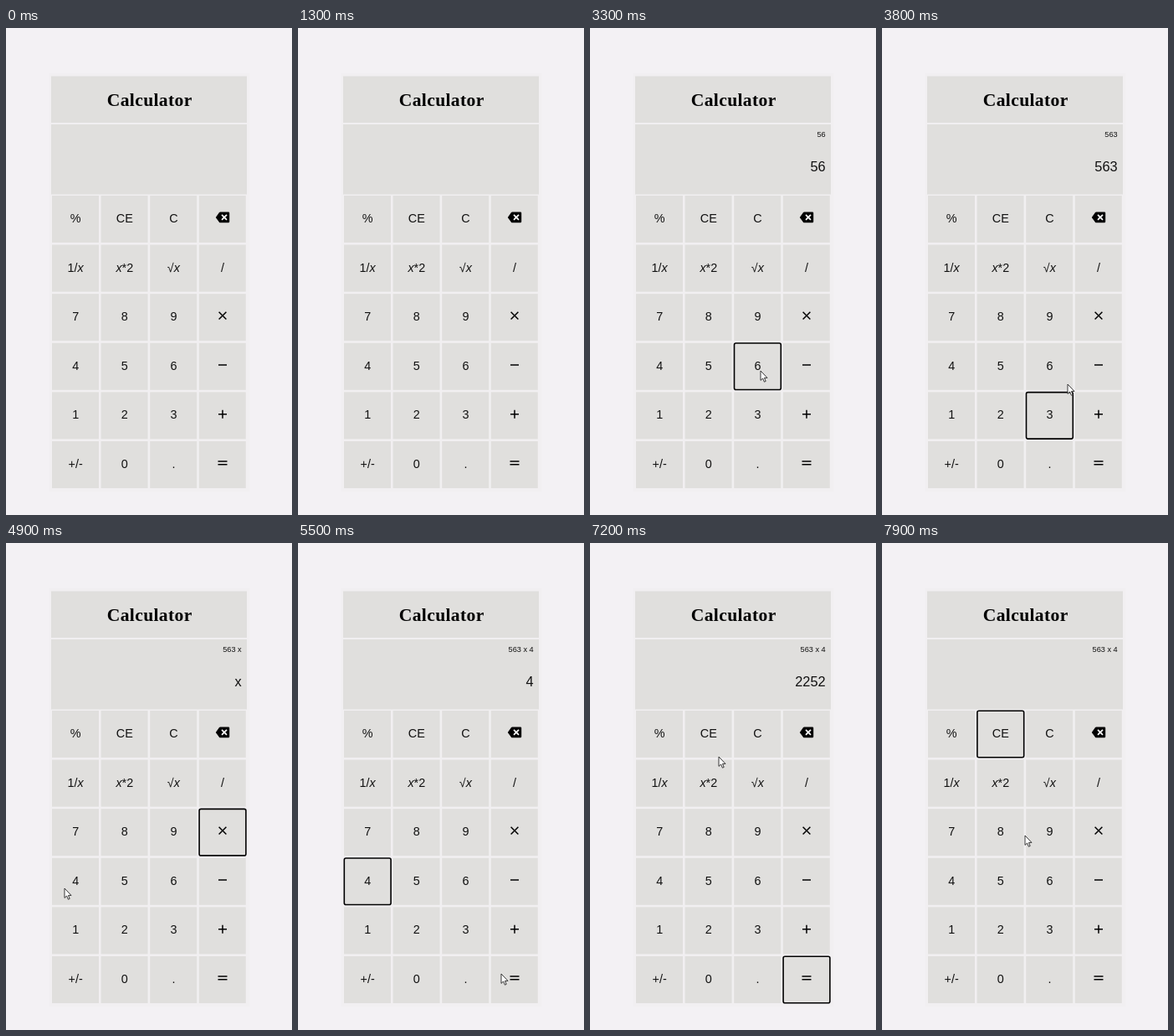
These frames come from a looping animation (342x581 px, 8 s). An HTML page:

```html
<!DOCTYPE html>
<html lang="en">
<head>
<meta charset="utf-8">
<title>Calculator</title>
<style>
  html, body { margin: 0; width: 100%; height: 100%; overflow: hidden; background: #f3f1f4; }
  svg { display: block; }
  text { font-family: "Liberation Sans", Arial, sans-serif; fill: #111; }
  .title { font: bold 21.6px "Liberation Serif", "Times New Roman", serif; letter-spacing: .35px; fill: #000; }
  .label { font-size: 14.4px; text-anchor: middle; }
  .var { font-style: italic; }
  .panel { fill: #e0dfdd; }
  .icon { fill: none; stroke: #000; stroke-width: 1.5; }
  #history, #result { text-anchor: end; }
  #history { font-size: 9.2px; }
  #result { font-size: 16.4px; }
  #focus { fill: none; stroke: #000; stroke-width: 1.6; }
</style>
</head>
<body>
<svg width="342" height="581" viewBox="0 0 342 581">
  <rect x="51.5" y="54" width="240" height="499" fill="#f1eff1"/>
  <rect class="panel" x="54" y="57.5" width="234" height="55.5"/>
  <rect class="panel" x="54" y="115" width="234" height="83.5"/>
  <text class="title" x="171.7" y="92.6" text-anchor="middle">Calculator</text>
  <text id="history" x="281.7" y="130"/>
  <text id="result" x="281.7" y="171"/>
  <g id="keys"></g>
  <rect id="focus" x=".3" y=".2" width="55.8" height="55.5" rx="2"/>
  <path id="cursor" d="M0 0V11.4L2.6 9L4.4 13.2L6.2 12.4L4.5 8.4H8Z" fill="#fff" stroke="#222" stroke-width=".9"/>
</svg>
<script>
const $ = id => document.getElementById(id);
const LOOP = 8000, STEP = 100, PITCH = 58.6;

const symbols = "% CE C del 1/x x*2 √x / 7 8 9 x 4 5 6 - 1 2 3 + +/- 0 . =".split(" ");
const icon = d => `<path class="icon" d="${d}"/>`;
const icons = {
  del: '<path d="M-8.2-1.5L-4-7.5Q-3.5-8-2.8-8H7Q8.2-8 8.2-6.8V3.6Q8.2 4.8 7 4.8H-2.8Q-3.5 4.8-4 4.2Z"/>' +
    '<path d="M-1-4.6L5 1.4M5-4.6L-1 1.4" stroke="#fff" stroke-width="1.7"/>',
  x: icon("M-4.4-6L4.4 2.8M4.4-6L-4.4 2.8"),
  "-": icon("M-5-1.3H5"),
  "+": icon("M-5-1.2H5M0-6.2V3.8"),
  "=": icon("M-5.5-3.5H5.5M-5.5 .3H5.5")
};

const corner = symbol => {
  const i = symbols.indexOf(symbol);
  return [55 + i % 4 * PITCH, 200 + Math.floor(i / 4) * PITCH];
};

$("keys").innerHTML = symbols.map(symbol => {
  const [left, top] = corner(symbol);
  const label = symbol.replace("x", '<tspan class="var">x</tspan>');
  const face = icons[symbol] || `<text class="label" y="4.5">${label}</text>`;
  return `<rect class="panel" x="${left}" y="${top}" width="56" height="56"/>
    <g transform="translate(${left + 28.2} ${top + 27.5})">${face}</g>`;
}).join("");

// The pointer glides to each key; dx, dy place its tip from the key's centre.
const moves = [
  { key: "x", leave: 600, arrive: 1100, dx: 26, dy: 10 },
  { key: "5", leave: 1700, arrive: 2500, press: 2800, dx: -23, dy: -4 },
  { key: "6", leave: 2800, arrive: 3200, press: 3300 },
  { key: "3", leave: 3300, arrive: 3600, press: 3700, dy: -5 },
  { key: "x", leave: 3600, arrive: 4150, press: 4300 },
  { key: "4", leave: 4300, arrive: 4900, press: 5100, dx: -13, dy: 8 },
  { key: "=", leave: 5100, arrive: 5600, press: 5800 },
  { key: "CE", leave: 6450, arrive: 7350, press: 7400 },
  { key: "8", leave: 7500, arrive: 7900, dx: 29, dy: 4 }
];

const ease = k => k * k * (3 - 2 * k);

function pointerAt(t) {
  let x = 324, y = 344;
  for (const { key, leave, arrive, dx = 4, dy = 5 } of moves) {
    if (t <= leave) break;
    const k = ease(Math.min(1, (t - leave) / (arrive - leave)));
    const [left, top] = corner(key);
    x += (left + 28 + dx - x) * k;
    y += (top + 28 + dy - y) * k;
  }
  return [Math.round(x), Math.round(y)];
}

function press({ history, result }, key) {
  if (key === "CE") return { history, result: "" };
  if (key === "x") return { history: history + " x", result: "x" };
  if (key === "=") {
    const [a, b] = history.split(" x ");
    return { history, result: a * b };
  }
  return result === "x"
    ? { history: history + " " + key, result: key }
    : { history: history + key, result: result + key };
}

function draw(now) {
  const t = Math.floor(now % LOOP / STEP) * STEP;
  const pressed = moves.filter(m => m.press <= t).map(m => m.key);
  const { history, result } = pressed.reduce(press, { history: "", result: "" });
  $("history").textContent = history;
  $("result").textContent = result;

  const focused = pressed.pop();
  $("focus").style.visibility = focused ? "visible" : "hidden";
  if (focused) $("focus").setAttribute("transform", `translate(${corner(focused)})`);

  const shown = t >= 1800 || (t >= 700 && t < 1300);
  $("cursor").style.visibility = shown ? "visible" : "hidden";
  $("cursor").setAttribute("transform", `translate(${pointerAt(t)})`);
}

const start = performance.now();
function tick() {
  draw(performance.now() - start);
  requestAnimationFrame(tick);
}
tick();
</script>
</body>
</html>
```
